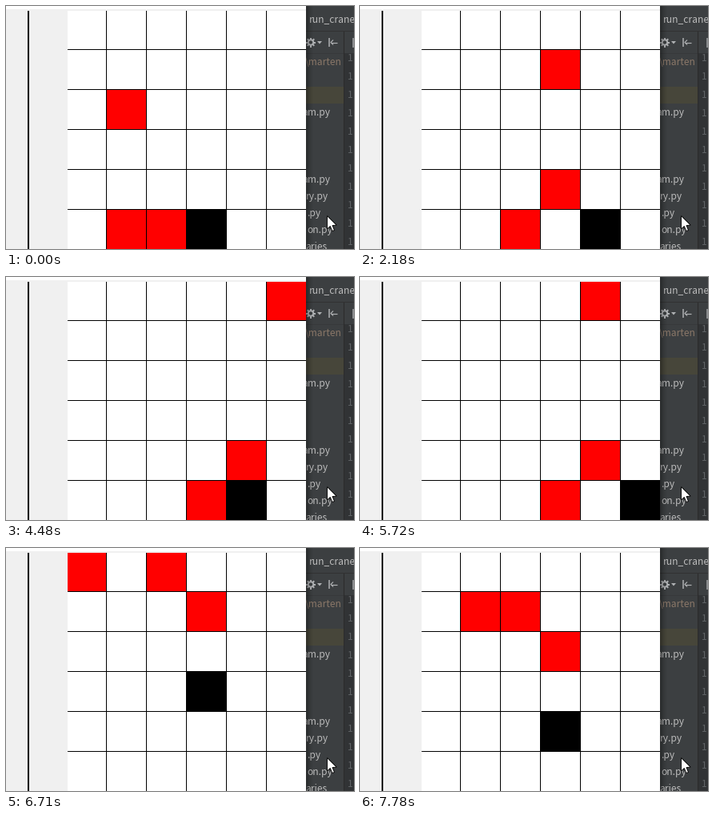
Animation of 435 by 304 pixels, one loop 8000 ms. Source, as a matplotlib script:

```python
import numpy as np
import matplotlib.pyplot as plt
from matplotlib.animation import FuncAnimation
from matplotlib.patches import Circle, Polygon, Rectangle

W, H, DPI = 435, 304, 64
LOOP, STEP = 8000, 20
CELL = 50
X0, Y0 = 76, 5            # corner of the board's first visible cell
EDGE = 375                # right edge of the board window

# Each episode: start time and starting (column, row) of every agent.
EPISODES = {
    0: dict(a=(1, 2), b=(1, 5), c=(2, 5), k=(3, 5)),
    6710: dict(a=(2, 0), b=(0, 0), c=(3, 1), k=(3, 3)),
}
# Time and moves: agent letter followed by direction.
MOVES = [
    (180, "aR kR"), (430, "aU cR"), (680, "aR bL"), (930, "aU bR"),
    (1180, "aL bR"), (1430, "aD"), (2180, "aR cU"), (2430, "aU bR cR"),
    (2680, "aR"), (4480, "aR"), (4730, "aL"), (5720, "kR"), (5970, "bR"),
    (6290, "aD bL cR"), (6530, "aD bR"), (6960, "aL bD"), (7210, "cD kD"),
    (7460, "aR cU"), (7780, "aD bR cD"),
]
DIRS = dict(L=(-1, 0), R=(1, 0), U=(0, -1), D=(0, 1))


def positions(t):
    start = max(s for s in EPISODES if s <= t)
    pos = dict(EPISODES[start])
    for when, steps in MOVES:
        if start < when <= t:
            for name, way in steps.split():
                (x, y), (dx, dy) = pos[name], DIRS[way]
                pos[name] = (x + dx, y + dy)
    return pos


fig = plt.figure(figsize=(W / DPI, H / DPI), dpi=DPI)
ax = fig.add_axes([0, 0, 1, 1])
ax.set_xlim(0, W)
ax.set_ylim(H, 0)
ax.axis("off")


def rect(x, y, w, h, color, z=1, alpha=None):
    return ax.add_patch(Rectangle((x, y), w, h, fc=color, lw=0, alpha=alpha,
                                  antialiased=False, zorder=z))


def label(x, y, s, color="#bbbbbb", ha="left", size=12):
    ax.text(x, y + 4, s, color=color, ha=ha, va="baseline", zorder=1.5,
            size=size * 72 / DPI, family="Noto Sans CJK JP")


def line(xs, ys, color="#afb1b3", width=1.0):
    ax.plot(xs, ys, color=color, lw=width * 72 / DPI, zorder=1.5,
            solid_capstyle="butt")


def draw_editor():
    rect(EDGE, 0, W - EDGE, H, "#3c3f41")
    rect(EDGE, 31, W - EDGE, 1, "#323232")
    rect(EDGE, 59, 47, 1, "#37393b")
    rect(EDGE, 101, 47, 21, "#47463a")
    rect(422, 32, 1, H - 32, "#2b2b2b")
    rect(423, 59, W - 423, H - 59, "#313335")
    rect(433, 40, 2, 12, "#8a8c8e")

    label(379, 16, "run_crane")
    label(374, 70, "\\marten", "#8a7768")
    for y, end, s in [(133, 405, "am.py"), (217, 405, "am.py"),
                      (238, 403, "ry.py"), (259, 393, ".py"),
                      (280, 408, "on.py"), (301, 401, "aries")]:
        label(end, y, s, ha="right")
    for y in range(65, H, 23):
        label(427, y, "1", "#606366")

    # gear with menu arrow
    for a in np.arange(8) * np.pi / 4:
        c, s = np.cos(a), np.sin(a)
        line([381 + 2 * c, 381 + 6 * c], [45.5 + 2 * s, 45.5 + 6 * s], width=2)
    ax.add_patch(Circle((381, 45.5), 3.2, fc="#3c3f41", ec="#afb1b3",
                        lw=2 * 72 / DPI, zorder=1.6))
    ax.add_patch(Polygon([(389, 44), (395, 44), (392, 47.5)], fc="#afb1b3",
                         lw=0, zorder=1.5))
    # collapse button
    line([403.5, 403.5], [40, 51], width=1.5)
    line([406, 414], [45.5, 45.5], width=1.2)
    line([409, 406, 409], [42.5, 45.5, 48.5], width=1.2)

    for i in range(9):
        rect(EDGE + i, 0, 1, H, "black", 1.8, 0.32 * (1 - i / 9) ** 1.5)


def draw_board():
    rect(0, 0, EDGE, H, "white", 2)
    for i in range(5):
        rect(125 + CELL * i, 6, 1, H, "black", 4)
        rect(77, 54 + CELL * i, EDGE - 77, 1, "black", 4)
    rect(0, 4, 77, H, "#f0f0f0", 5)
    rect(0, 4, EDGE, 2, "#f0f0f0", 5)
    rect(27, 6, 2, H, "black", 6)


def draw_pointer(x, y):
    shape = np.array([(0, 0), (0, 16.5), (3.8, 13), (6.4, 19), (9, 18),
                      (6.5, 12), (11.7, 11.7)])
    ax.add_patch(Polygon(shape + (x, y), fc="white", ec="black",
                         lw=0.9 * 72 / DPI, zorder=7))


draw_editor()
draw_board()
draw_pointer(401.5, 262.5)
agents = {n: rect(0, 0, CELL - 1, CELL - 1, "black" if n == "k" else "red", 3)
          for n in "abck"}


def update(i):
    for name, (col, row) in positions(i * STEP + STEP // 2).items():
        agents[name].set_xy((X0 + CELL * col, Y0 + CELL * row))
    return list(agents.values())


anim = FuncAnimation(fig, update, frames=LOOP // STEP, interval=STEP,
                     repeat=True, repeat_delay=0, blit=False)
plt.show()
```
